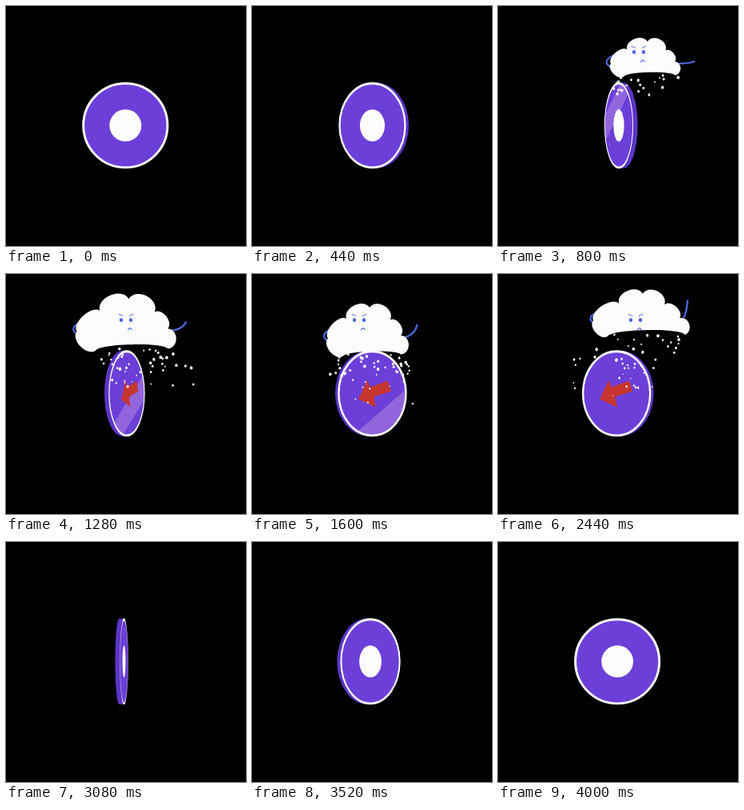
An HTML page with a canvas for the animation above (4040 ms loop, 300 by 300 pixels).

```html
<!DOCTYPE html>
<html lang="en">
<head>
<meta charset="utf-8">
<title>Coin under a snow cloud</title>
<style>
  html, body { margin: 0; width: 100%; height: 100%; overflow: hidden; background: #000; }
  canvas { display: block; width: 100vmin; height: 100vmin; }
</style>
</head>
<body>
<canvas id="stage" width="300" height="300"></canvas>
<script>
const ctx = document.getElementById('stage').getContext('2d');
const LOOP = 4040, STEP = 40;
const WHITE = '#fcfcfc', BLUE = '#4c68dc', RED = '#c6362f';
const FACE = '#6c3fd8', SIDE = '#5c35c5', SHINE = '#9166dd';
const RADIUS = 52.6, MIDDLE = 149.3;

const lerp = (a, b, k) => a + (b - a) * k;
const clamp = k => Math.min(1, Math.max(0, k));
const ease = k => clamp(k) ** 2 * (3 - 2 * clamp(k));

let seed = 17;
const random = () => (seed = seed * 16807 % 2147483647) / 2147483647;
const between = (a, b) => lerp(a, b, random());

function disc(x, y, rx, ry = rx) {
  ctx.beginPath();
  ctx.ellipse(x, y, rx, ry, 0, 0, 7);
}

// ---- Cloud ----

const CLOUD_IN = 600, CLOUD_OUT = 2920, FACE_Y = 57.5;

// Valleys between lobes in a unit box, each with the bulge of the lobe after it
const lobes = [
  [-.5, .66, .24], [-.27, .31, .33], [.02, .11, .36], [.28, .33, .3],
  [.41, .61, .42], [.41, .95, -.07], [-.31, .98, .3]
];

const cloudKeys = [
  { at: 800, x: 185, w: 88, top: 39, h: 50, look: -9, pinch: 0 },
  { at: 1000, x: 185, w: 122, top: 22, h: 75, look: -2, pinch: 0 },
  { at: 1280, x: 151, w: 125, top: 23, h: 74, look: -1, pinch: 0 },
  { at: 1600, x: 145, w: 100, top: 34, h: 70, look: -11, pinch: 0 },
  { at: 2160, x: 143, w: 125, top: 20, h: 74, look: -4, pinch: .1 },
  { at: 2440, x: 179, w: 136, top: 18, h: 61, look: -7, pinch: .35 },
  { at: 2800, x: 186, w: 136, top: 11, h: 60, look: -7, pinch: .35 }
];

function cloudAt(t) {
  const next = Math.max(1, cloudKeys.findIndex(key => key.at > t));
  const i = t >= cloudKeys.at(-1).at ? cloudKeys.length - 1 : next;
  const a = cloudKeys[i - 1], b = cloudKeys[i];
  const k = ease((t - a.at) / (b.at - a.at));
  const c = {};
  for (const name in a) c[name] = lerp(a[name], b[name], k);
  return c;
}

// Point of the unit box on the stage; pinch narrows the upper part
const place = (c, u, v) => [c.x + u * c.w * (1 - c.pinch * (1 - v)), c.top + v * c.h];

function cloudShape(c) {
  const points = lobes.map(([u, v]) => place(c, u, v));
  ctx.beginPath();
  ctx.moveTo(...points[0]);
  lobes.forEach(([, , bulge], i) => {
    const [x, y] = points[i], [ex, ey] = points[(i + 1) % points.length];
    const dx = ex - x, dy = ey - y, b = bulge * 4 / 3;
    ctx.bezierCurveTo(x + dx * .06 + dy * b, y + dy * .06 - dx * b,
      ex - dx * .06 + dy * b, ey - dy * .06 - dx * b, ex, ey);
  });
}

function curve(x, y, cx, cy, ex, ey, width) {
  ctx.lineWidth = width;
  ctx.beginPath();
  ctx.moveTo(x, y);
  ctx.quadraticCurveTo(cx, cy, ex, ey);
  ctx.stroke();
}

function drawArms(c, t) {
  const [lx, ly] = place(c, -.47, .62);
  curve(lx + 2, ly - 9, lx - 18, ly, lx + 2, ly + 9, 2.3);

  const [rx, ry] = place(c, .41, .61);
  const lift = (t - 800) * .0007;
  const hx = rx + 24 * Math.cos(lift), hy = ry - 24 * Math.sin(lift);
  curve(rx, ry + 3, lerp(rx, hx, .8), ry + 2, hx, hy, 2.3);
}

function drawFace(x, y) {
  ctx.fillStyle = BLUE;
  for (const side of [-1, 1]) {
    disc(x + side * 6, y, 2.2, 2.6);
    ctx.fill();
    curve(x + side * 9, y - 7, x + side * 6, y - 6.5, x + side * 4, y - 5, 1);
  }
  curve(x + 2.5, y + 12.5, x + 4.5, y + 8, x + 7, y + 12, 1.1);
}

function drawCloud(t) {
  if (t < CLOUD_IN || t >= CLOUD_OUT) return;
  const c = cloudAt(t);
  const grow = lerp(.1, 1, ease((t - CLOUD_IN) / 160) * ease((CLOUD_OUT - t) / 120));
  ctx.save();
  ctx.translate(c.x, FACE_Y);
  ctx.scale(grow, grow);
  ctx.translate(-c.x, -FACE_Y);
  ctx.strokeStyle = BLUE;
  ctx.lineCap = 'round';
  drawArms(c, t);
  ctx.fillStyle = WHITE;
  cloudShape(c);
  ctx.fill();
  drawFace(c.x + c.look, FACE_Y);
  ctx.restore();
}

// ---- Snow ----

const flakes = Array.from({ length: 270 }, (_, i) => {
  const born = 640 + i * 7.5;
  const c = cloudAt(born);
  const [x, y] = place(c, between(-.46, .46), .95);
  return { born, x, y, speed: between(.08, .18), size: between(.9, 1.9), life: between(280, 400) };
});

function drawSnow(t) {
  ctx.fillStyle = WHITE;
  for (const f of flakes) {
    const age = t - f.born;
    if (age < 0 || age > f.life) continue;
    const r = f.size * Math.min(1, 1.6 - age / f.life);
    disc(f.x, f.y + f.speed * age, r, r * 1.15);
    ctx.fill();
  }
}

// ---- Coin ----

function drawShine(t) {
  const k = (t - 600) / 1280;
  if (k < 0 || k > 1) return;
  const top = lerp(-1.29, .58, 1 - (1 - k) ** 2);
  ctx.save();
  disc(0, 0, RADIUS);
  ctx.clip();
  ctx.globalAlpha = clamp((1 - k) * 5);
  ctx.rotate(-.607);
  ctx.fillStyle = SHINE;
  ctx.fillRect(-60, top * RADIUS, 120, 27);
  ctx.restore();
}

function drawArrow() {
  ctx.fillStyle = RED;
  ctx.beginPath();
  [[-25, 8], [-11, -16], [-7, -7], [21, -15], [26, -2], [-1, 5], [2, 18]]
    .forEach(([x, y]) => ctx.lineTo(x, y - .8));
  ctx.fill();
}

function drawCoin(t) {
  const angle = t / LOOP * Math.PI * 2;
  const sin = Math.sin(angle), cos = Math.cos(angle);
  const width = .02 + .98 * Math.abs(cos);
  const depth = 6 * sin * Math.sign(cos);
  ctx.save();
  ctx.translate(MIDDLE + 1.8 * sin, MIDDLE);

  ctx.fillStyle = SIDE;
  disc(depth, 0, (RADIUS + 1) * width, RADIUS + 1);
  ctx.fill();
  ctx.fillRect(Math.min(0, depth), -RADIUS - 1, Math.abs(depth), RADIUS * 2 + 2);

  ctx.scale(width, 1);
  ctx.fillStyle = FACE;
  disc(0, 0, RADIUS);
  ctx.fill();
  drawShine(t);
  ctx.strokeStyle = WHITE;
  ctx.lineWidth = 2.9;
  disc(0, 0, RADIUS);
  ctx.stroke();

  if (cos < 0) {
    ctx.translate((.8 + 3 * sin) / width, 0);
    drawArrow();
  } else {
    ctx.fillStyle = WHITE;
    disc(0, 0, 20);
    ctx.fill();
  }
  ctx.restore();
}

// ---- Loop ----

function draw(t) {
  ctx.fillStyle = '#000';
  ctx.fillRect(0, 0, 300, 300);
  drawCoin(t);
  drawSnow(t);
  drawCloud(t);
}

const start = performance.now();
function tick() {
  const t = (performance.now() - start) % LOOP;
  draw(Math.floor(t / STEP) * STEP);
  requestAnimationFrame(tick);
}
tick();
</script>
</body>
</html>
```
